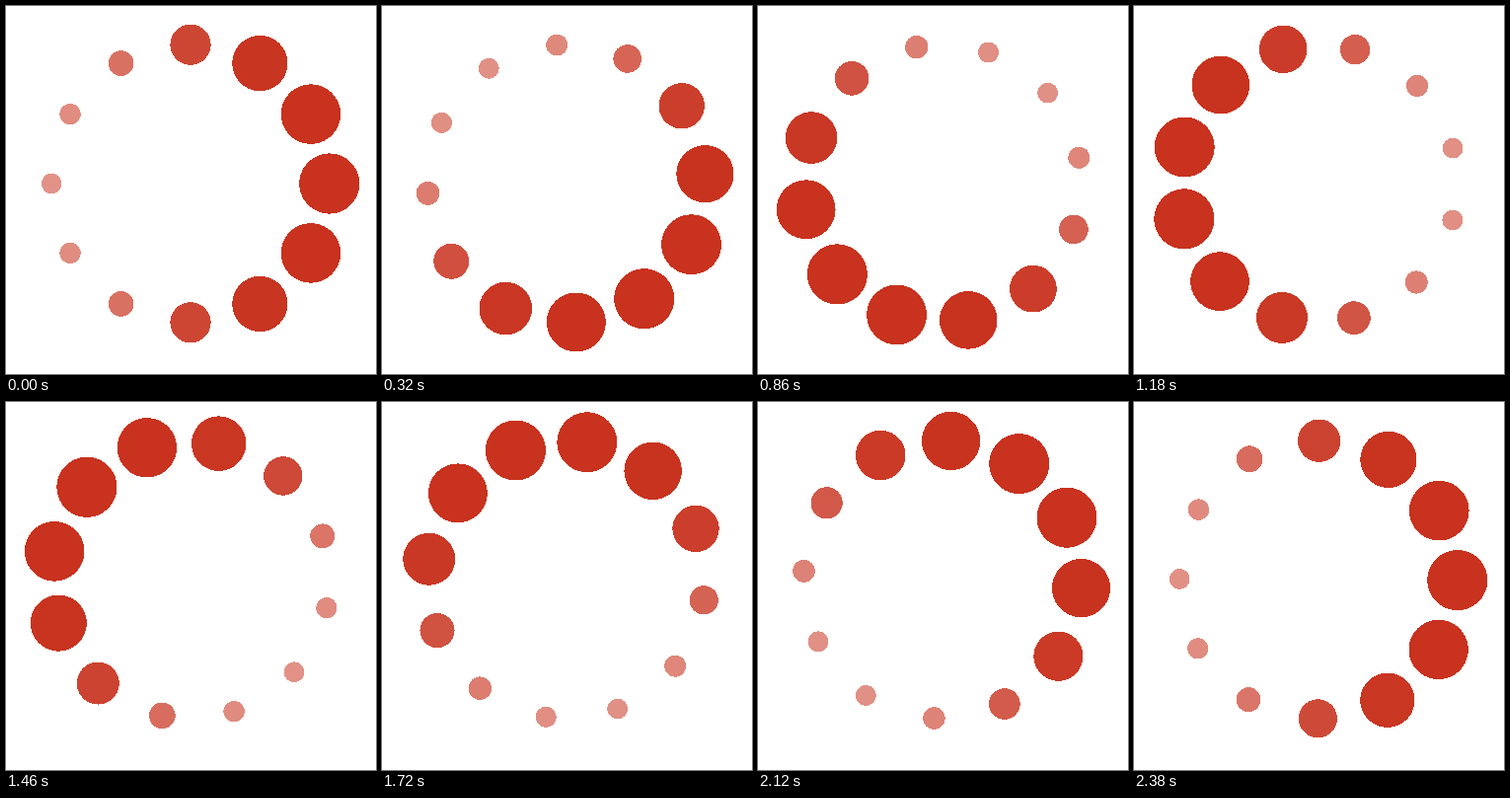
An HTML page with a canvas that plays this animation: 375x373 px, repeating every 2.4 s.

```html
<!DOCTYPE html>
<html lang="en">
<head>
<meta charset="utf-8">
<title>Loading spinner</title>
<style>
  html, body { margin: 0; width: 100%; height: 100%; overflow: hidden; background: #fff; }
  canvas { display: block; }
</style>
</head>
<body>
<canvas id="stage" width="375" height="373"></canvas>
<script>
const canvas = document.getElementById('stage');
const ctx = canvas.getContext('2d');
const LOOP = 2400, STEP = 20, DOTS = 12;
const CENTER = { x: 187, y: 180 }, RING = 140.8;

// Smooth fall from high to low around a middle angle, in degrees.
const falloff = (distance, high, low, middle, width) =>
  low + (high - low) / (1 + Math.exp((distance - middle) / width));

// Fills a disc row by row, which keeps its edge free of antialiasing.
function disc(cx, cy, radius) {
  for (let y = Math.floor(cy - radius); y <= cy + radius; y++) {
    const dy = y + 0.5 - cy;
    if (Math.abs(dy) >= radius) continue;
    const half = Math.sqrt(radius * radius - dy * dy);
    const left = Math.round(cx - half);
    ctx.fillRect(left, y, Math.round(cx + half) - left, 1);
  }
}

function draw(time) {
  const u = Math.floor((time % LOOP) / STEP) * STEP / LOOP;
  const peak = 360 * u;
  ctx.fillStyle = '#fff';
  ctx.fillRect(0, 0, canvas.width, canvas.height);
  for (let k = 0; k < DOTS; k++) {
    // The ring drifts back one slot while the peak makes a full turn.
    const angle = (k - u) * 360 / DOTS;
    const turn = (angle - peak + 720) % 360;
    const distance = Math.min(turn, 360 - turn);
    const rad = angle * Math.PI / 180;
    const alpha = falloff(distance, 1, 0.53, 110, 15);
    ctx.fillStyle = `rgba(200, 50, 30, ${alpha})`;
    disc(CENTER.x + RING * Math.cos(rad), CENTER.y + RING * Math.sin(rad),
      falloff(distance, 30.6, 10.2, 90.5, 15.5));
  }
}

let start;
function tick(now) {
  start ??= now;
  draw(Math.max(0, now - start));
  requestAnimationFrame(tick);
}
draw(0);
requestAnimationFrame(tick);
</script>
</body>
</html>
```
